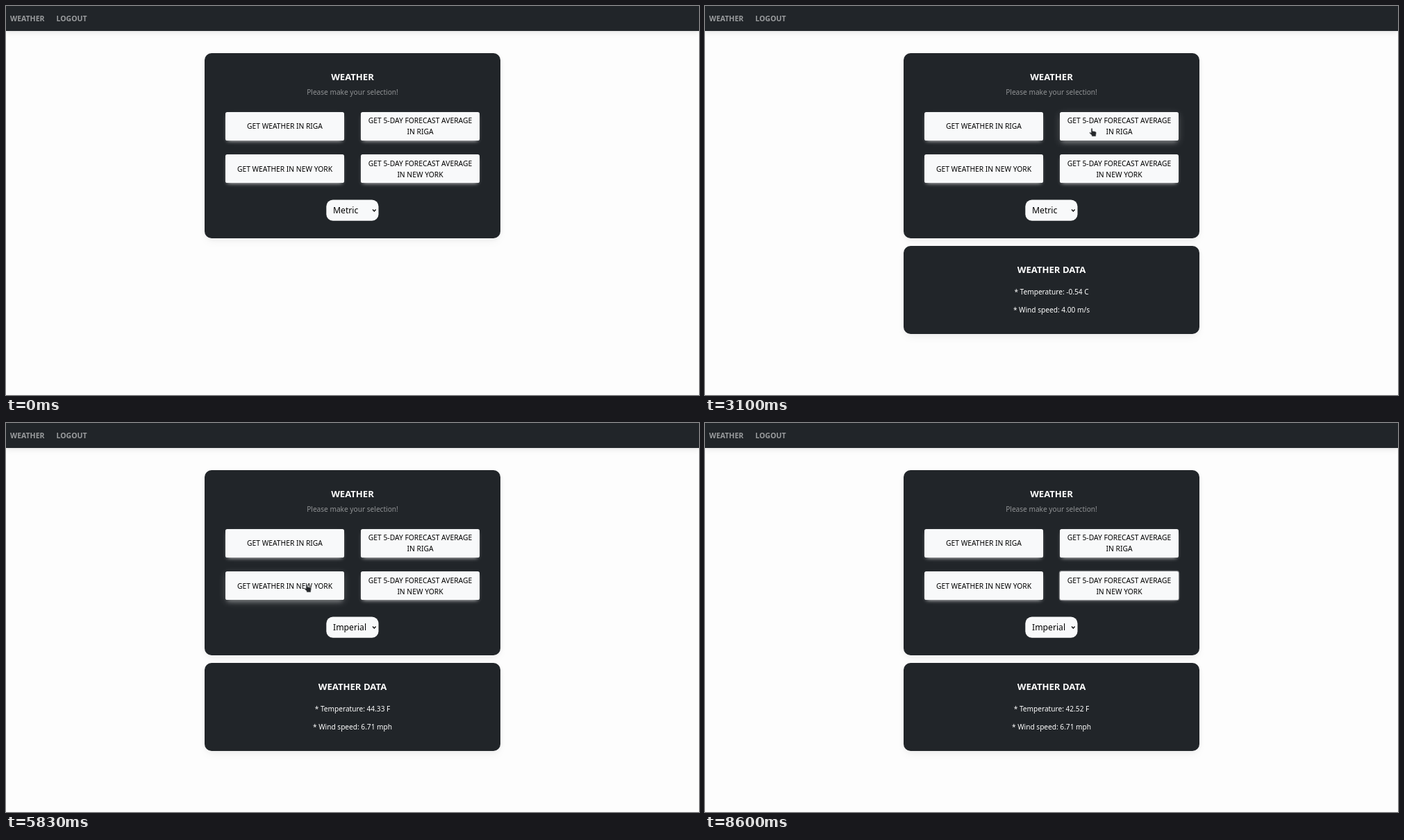
Write an HTML page that moves like this. It is 998x561 px and loops after 8630 ms.

```html
<!DOCTYPE html>
<html lang="en">
<head>
<meta charset="utf-8">
<title>Weather</title>
<style>
  html, body { margin: 0; width: 100%; height: 100%; overflow: hidden; background: #fdfdfd; }
  #stage { position: relative; width: 998px; height: 561px; overflow: hidden; }
  #stage div, svg { position: absolute; }
  svg { left: 0; top: 0; }
  .nav { left: 0; top: 0; width: 998px; height: 36px; background: #212529;
    box-shadow: 0 2.6px 8px rgba(0,0,0,.07), 0 1.3px 2.6px rgba(0,0,0,.05); }
  .card { left: 285.5px; width: 426.5px; border-radius: 10px; background: #212529;
    box-shadow: 0 1.3px 10px -2px rgba(0,0,0,.07), 0 6.6px 13.2px -1.3px rgba(0,0,0,.04); }
  .btn { width: 171px; height: 41px; border-radius: 2.6px; background: #f8f9fa; }
  text { font-family: "Noto Sans", "Open Sans", sans-serif; font-size: 10.3px; white-space: pre; }
  .mid { text-anchor: middle; }
  .head { font-size: 13.1px; font-weight: 700; fill: #fff; }
  .link { font-size: 10.5px; font-weight: 700; fill: #9a9c9e; }
  .hint { font-size: 10.15px; fill: #909294; }
  .data { font-size: 10.15px; fill: #fff; }
  .pick { font-size: 12.2px; }
</style>
</head>
<body>
<div id="stage">
  <div class="nav"></div>
  <div class="card" style="top:68px;height:266.5px"></div>
  <div class="card" id="dataCard" style="top:345.5px;height:127.5px"></div>
  <svg id="ui" width="998" height="561" viewBox="0 0 998 561">
    <text class="link" x="6" y="21.6">WEATHER</text>
    <text class="link" x="72.5" y="21.6">LOGOUT</text>
    <text class="head mid" x="499" y="107.3">WEATHER</text>
    <text class="hint mid" x="499" y="127.6">Please make your selection!</text>
    <g id="labels"></g>
    <rect x="461.3" y="279.5" width="75.2" height="30.3" rx="9.5" fill="#f8f9fa"/>
    <text class="pick" id="unit" x="471" y="299.3"></text>
    <path d="M528 293.6l2.3 2.4 2.3-2.4" fill="none" stroke="#111" stroke-width="1.5"/>
    <g id="data">
      <text class="head mid" x="499" y="384.8">WEATHER DATA</text>
      <text class="data mid" id="temp" x="499" y="415.7"></text>
      <text class="data mid" id="wind" x="499" y="442"></text>
    </g>
    <g id="menu">
      <rect x="461.5" y="309.5" width="74.8" height="33" fill="#fff" stroke="#8a8c8e"/>
      <rect id="mark" x="462" width="73.8" height="16" fill="#1e90ff"/>
      <text class="pick" id="opt0" x="471" y="322.4">Metric</text>
      <text class="pick" id="opt1" x="471" y="338.4">Imperial</text>
    </g>
    <g id="cursor" stroke="#c8c9ca" stroke-width=".6" stroke-linejoin="round" fill="#26282b">
      <path id="arrow" d="M0 0V10.4L2.4 8.2 4 12 5.9 11.2 4.3 7.5H7.4Z"/>
      <path id="hand" d="M-1 .8Q0-.4 1 .8V4.2L5 5Q6.6 5.4 6.5 7L6 10V12H0V10.4L-3.2 7.3Q-3.6 5.8-2.2 6L-1 7Z"/>
    </g>
  </svg>
</div>
<script>
const LOOP = 8630, FADE = 150;
const $ = id => document.getElementById(id);
const show = (el, on) => { el.style.display = on ? '' : 'none'; };

// Moments when the page reacts
const T = { enter: 500, card: 1900, open: 3850, close: 4500, york: 5600, average: 6850, leave: 7900, blur: 8525 };

// Pointer path: time, x, y
const PATH = [
  [500, 968, 312], [1250, 384, 171], [2270, 384, 171], [2430, 420, 180], [2570, 420, 180],
  [2800, 557, 176], [3250, 557, 176], [3700, 509, 290], [4060, 509, 290], [4300, 502, 331],
  [4550, 502, 331], [4950, 433, 232], [6150, 433, 232], [6350, 590, 239], [7070, 590, 239],
  [7900, 936, 405]
];

// Clicks move the focus to a button, or to none (-1)
const FOCUS = [[1650, 0], [2900, 1], [3800, -1], [5300, 2], [6600, 3], [T.blur, -1]];

const LABELS = [
  ['GET WEATHER IN RIGA'],
  ['GET 5-DAY FORECAST AVERAGE', 'IN RIGA'],
  ['GET WEATHER IN NEW YORK'],
  ['GET 5-DAY FORECAST AVERAGE', 'IN NEW YORK']
];

const buttons = LABELS.map((lines, i) => {
  const x = i % 2 ? 511 : 316, y = i < 2 ? 152.5 : 214.3;
  const el = document.createElement('div');
  el.className = 'btn';
  el.style.left = x + 'px';
  el.style.top = y + 'px';
  $('stage').insertBefore(el, $('ui'));
  lines.forEach((line, n) => {
    const label = document.createElementNS($('ui').namespaceURI, 'text');
    label.setAttribute('class', 'mid');
    label.setAttribute('x', x + 85.5);
    label.setAttribute('y', y + 24.3 + (n - (lines.length - 1) / 2) * 15.9);
    label.textContent = line;
    $('labels').append(label);
  });
  return { el, x, y };
});

function pointerAt(t) {
  if (t < T.enter || t >= T.leave) return null;
  const i = PATH.findIndex(p => p[0] > t);
  const [t0, x0, y0] = PATH[i - 1], [t1, x1, y1] = PATH[i];
  const u = (t - t0) / (t1 - t0), k = u * u * (3 - 2 * u);
  return { x: x0 + (x1 - x0) * k, y: y0 + (y1 - y0) * k };
}

function hoverAt(t) {
  const p = pointerAt(t);
  if (!p || (t >= T.open && t < T.close)) return -1;
  return buttons.findIndex(b => p.x >= b.x && p.x <= b.x + 171 && p.y >= b.y && p.y <= b.y + 41);
}

const focusAt = t => FOCUS.reduce((now, [at, i]) => t >= at ? i : now, -1);

// Share of the last FADE ms in which a state held: a linear transition
function level(test, t) {
  const n = 15;
  let sum = 0;
  for (let k = 0; k < n; k++) sum += test(t - k * FADE / n) ? 1 : 0;
  return sum / n;
}

function shadow(h, r) {
  const glow = (1 - .7 * h) * (1 - r);
  return `0 ${2.64 * (1 + h)}px 5.94px -2.64px rgba(251,251,251,${glow}),` +
    `0 ${2.64 * h}px ${11.9 * h}px 0 rgba(251,251,251,${.2 * h}),` +
    `0 0 0 ${2.64 * r}px rgba(211,212,213,${r ? .5 : 0})`;
}

function draw(t) {
  buttons.forEach((b, i) => {
    const h = level(s => hoverAt(s) === i, t);
    const r = level(s => focusAt(s) === i && hoverAt(s) !== i, t);
    b.el.style.boxShadow = shadow(h, r);
  });

  show($('dataCard'), t >= T.card);
  show($('data'), t >= T.card);
  const york = t >= T.york;
  const value = t >= T.average ? '42.52 F' : york ? '44.33 F' : '-0.54 C';
  $('temp').textContent = '* Temperature: ' + value;
  $('wind').textContent = '* Wind speed: ' + (york ? '6.71 mph' : '4.00 m/s');

  const p = pointerAt(t);
  const second = p && p.y > 326;
  $('unit').textContent = t >= T.close ? 'Imperial' : 'Metric';
  show($('menu'), t >= T.open && t < T.close);
  $('mark').setAttribute('y', second ? 326 : 310);
  $('opt0').setAttribute('fill', second ? '#000' : '#fff');
  $('opt1').setAttribute('fill', second ? '#fff' : '#000');

  show($('cursor'), p);
  if (p) {
    const hand = hoverAt(t) >= 0;
    $('cursor').setAttribute('transform', `translate(${p.x} ${p.y})`);
    show($('hand'), hand);
    show($('arrow'), !hand);
  }
}

const start = performance.now();
function tick() {
  draw((performance.now() - start) % LOOP);
  requestAnimationFrame(tick);
}
tick();
</script>
</body>
</html>
```
